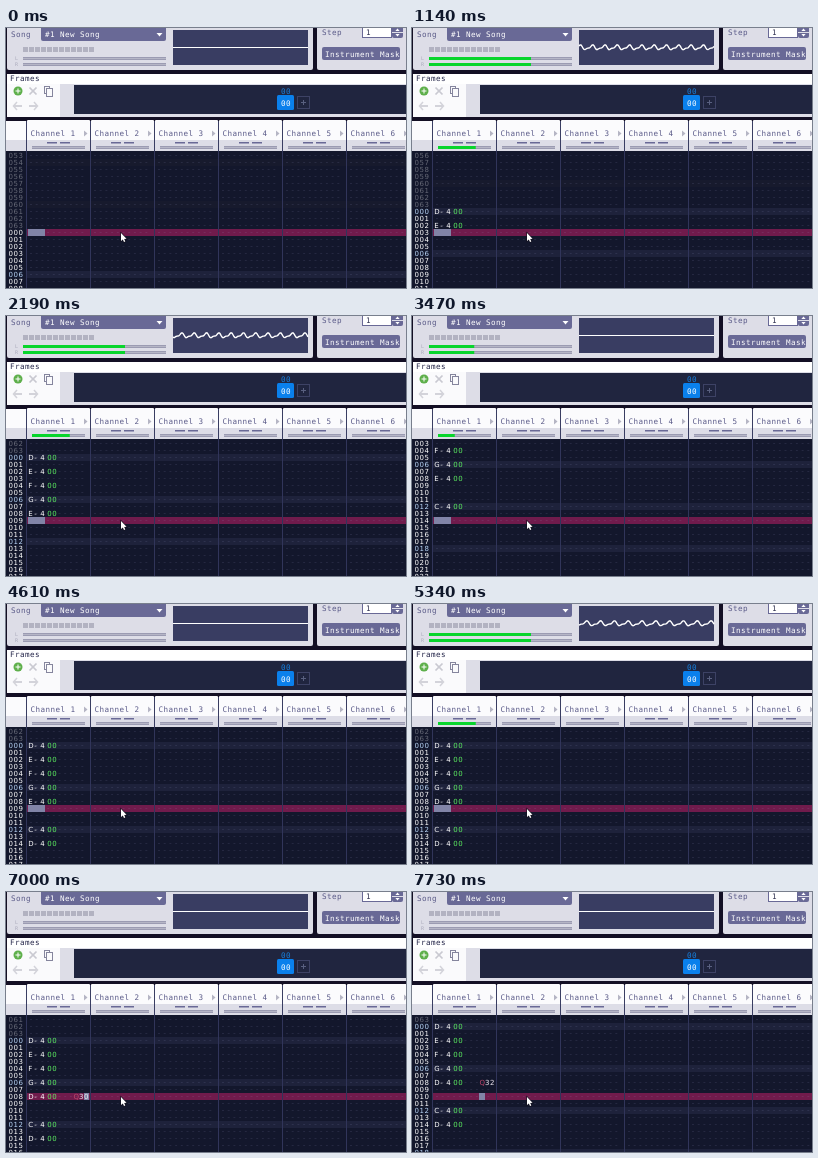
An HTML page with a canvas for the animation above (8 s loop, 400 by 260 pixels).

```html
<!DOCTYPE html>
<html lang="en">
<head>
<meta charset="utf-8">
<title>Tracker</title>
<style>
html, body { margin: 0; width: 400px; height: 260px; overflow: hidden; background: #130f24; }
canvas { display: block; }
</style>
</head>
<body>
<canvas id="stage" width="400" height="260"></canvas>
<script>
const ctx = document.getElementById('stage').getContext('2d');
const LOOP = 8000, ROWS = 64, PITCH = 7, CURSOR_Y = 201;
const PANEL = '#dddde7', PURPLE = '#696996', LABEL = '#5a5a88', GRAY = '#9b9bb2';
const GREEN = '#08d52c', NAVY = '#393d62';

// Notes are played on every second row, one per beat.
const phrases = [
  { start: 660, beat: 365, row: 0, keys: 'DEFGE' },
  { start: 3130, beat: 410, row: 12, keys: 'CD' },
  { start: 5270, beat: 400, row: 8, keys: 'D' }
];
const semitones = { C: 0, D: 2, E: 4, F: 5, G: 7 };
const notes = phrases.flatMap(({ start, beat, row, keys }) => [...keys].map((key, i) => ({
  on: start + i * beat,
  off: start + (i + 0.58) * beat,
  row: row + i * 2,
  name: key + '-4',
  period: 15.5 * 2 ** (-semitones[key] / 12)
})));

const glides = [
  { start: 0, end: 1, from: 0, to: 0 },
  { start: 660, end: 2667, from: 1, to: 12 },
  { start: 3130, end: 3745, from: 13, to: 16 },
  { start: 4410, end: 4610, from: 15, to: 9 },
  { start: 4870, end: 4871, from: 8, to: 8 },
  { start: 5270, end: 5271, from: 9, to: 9 },
  { start: 5750, end: 5751, from: 8, to: 8 }
];
const effect = { start: 6280, every: 560, back: 130, leave: 7730, row: 8, value: 'Q32' };
const cells = [[22, 17], [41, 11], [54, 11], [67, 6], [73, 5], [78, 5]];

const clamp = (v, lo, hi) => Math.min(hi, Math.max(lo, v));

function cursorAt(t) {
  if (t >= effect.leave) return { row: effect.row + 2, cell: 3 };
  if (t >= effect.start) {
    const age = t - effect.start;
    const digit = Math.floor(age / effect.every);
    const stepped = age % effect.every < effect.back;
    return { row: effect.row + stepped, cell: Math.min(5, 3 + digit + !stepped) };
  }
  const { start, end, from, to } = glides.findLast(g => g.start <= t);
  const u = clamp((t - start) / (end - start), 0, 1);
  return {
    row: Math.floor(from + (to - from) * u),
    cell: clamp(Math.floor((t - 5750) / 133), 0, 3)
  };
}

function soundAt(t) {
  const note = notes.findLast(n => n.on <= t);
  if (!note) return { level: 0, period: 0 };
  const held = t < note.off;
  return {
    level: held ? 102 : Math.max(0, 102 - (t - note.off) * 0.55),
    period: held ? note.period : 0
  };
}

function rect(x, y, w, h, color) {
  ctx.fillStyle = color;
  ctx.fillRect(x, y, w, h);
}

function round(x, y, w, h, color, r = 2) {
  ctx.fillStyle = color;
  ctx.beginPath();
  ctx.roundRect(x, y, w, h, r);
  ctx.fill();
}

function frame(x, y, w, h, color) {
  ctx.strokeStyle = color;
  ctx.lineWidth = 1;
  ctx.strokeRect(x + 0.5, y + 0.5, w, h);
}

function triangle(x, y, dx, dy, color) {
  ctx.fillStyle = color;
  ctx.beginPath();
  ctx.moveTo(x + dx, y + dy);
  ctx.lineTo(x - dy * 0.85, y + dx * 0.85);
  ctx.lineTo(x + dy * 0.85, y - dx * 0.85);
  ctx.fill();
}

function line(points, color, width = 1) {
  ctx.strokeStyle = color;
  ctx.lineWidth = width;
  ctx.beginPath();
  points.forEach(([x, y]) => ctx.lineTo(x, y));
  ctx.stroke();
}

function text(str, x, y, color, size = 7.6) {
  ctx.font = `${size}px "DejaVu Sans Mono", monospace`;
  ctx.letterSpacing = `${5 - size * 0.602}px`;
  ctx.fillStyle = color;
  ctx.fillText(str, x, y);
}

function gridText(str, x, y, color) {
  ctx.font = '7px "DejaVu Sans", sans-serif';
  ctx.letterSpacing = '0.6px';
  ctx.fillStyle = color;
  ctx.fillText(str, x, y);
}

function plus(x, y, r, color) {
  rect(x - r, y - 0.5, 2 * r, 1, color);
  rect(x - 0.5, y - r, 1, 2 * r, color);
}

function arrow(x, y, dir, color) {
  rect(x - 4, y - 1, 8, 2, color);
  line([[x + dir, y - 4], [x + dir * 4.5, y], [x + dir, y + 4]], color, 1.5);
}

function meter(x, y, w, filled) {
  rect(x, y, w, 3, GRAY);
  rect(x, y + 1, w, 1, '#b5b5c6');
  rect(x, y, filled, 3, GREEN);
}

function drawWave(t, period) {
  rect(167, 2, 135, 35, NAVY);
  const points = [];
  for (let x = 0; x <= 135; x++) {
    const a = 2 * Math.PI * (x / (period || 1) + t / 310);
    const y = period ? 2 * Math.sin(a) + 0.9 * Math.sin(2 * a + 0.6) : 0;
    points.push([167 + x, 19.5 + y]);
  }
  line(points, '#fff', period ? 1.4 : 1);
}

function drawTop(t, sound) {
  round(1, -4, 306, 46, PANEL);
  text('Song', 5, 8.5, LABEL);
  round(35, -2, 125, 15, PURPLE);
  text('#1 New Song', 39, 8.5, '#fff');
  triangle(153.5, 5, 0, 3.5, '#fff');
  for (let i = 0; i < 12; i++) rect(17 + i * 6, 19, 5, 5, '#b2b2c1');
  ['L', 'R'].forEach((side, i) => {
    text(side, 9, 32 + i * 6, '#aaaabc', 5);
    meter(17, 29 + i * 6, 143, sound.level);
  });
  drawWave(t, sound.period);

  round(311, -4, 95, 46, PANEL);
  text('Step', 316, 6.5, LABEL);
  rect(356, -1, 30, 11, PURPLE);
  rect(357, -1, 28, 10, '#fff');
  text('1', 360, 6.5, '#303250');
  round(386, -2, 11, 12, PURPLE);
  rect(386, 4, 11, 1, PANEL);
  triangle(391.5, 3, 0, -2.5, '#fff');
  triangle(391.5, 6, 0, 2.5, '#fff');
  round(316, 19, 78, 13, PURPLE);
  text('Instrument Mask', 319, 28.5, '#fff');
}

function drawFrames() {
  round(1, 46, 405, 43, PANEL);
  rect(1, 46, 399, 10, '#fff');
  rect(1, 56, 53, 33, '#fafafc');
  text('Frames', 4, 53, '#25264a');
  rect(68, 57, 332, 29, '#20253f');
  text('00', 275, 65.5, '#1680df');
  round(271, 67, 17, 15, '#0a80ec', 1.5);
  text('00', 275, 77.5, '#fff');
  frame(291, 68, 12, 12, '#3d4265');
  plus(297.5, 74.5, 2.5, '#596080');

  round(7.5, 58.5, 9, 9, '#5eaf4b', 5);
  plus(12, 63, 2.5, '#fff');
  line([[23.5, 59.5], [30.5, 66.5]], '#c9c9d1', 1.7);
  line([[30.5, 59.5], [23.5, 66.5]], '#c9c9d1', 1.7);
  frame(38, 58, 5, 7, '#85859d');
  rect(40, 60, 7, 9, '#fafafc');
  frame(40, 60, 6, 8, '#85859d');
  arrow(12, 78, -1, '#d3d3da');
  arrow(27, 78, 1, '#d3d3da');
}

function drawHeaders(level) {
  rect(0, 93, 400, 30, NAVY);
  rect(0, 93, 20, 20, '#fbfbfd');
  rect(0, 112, 20, 11, PANEL);
  for (let i = 0; i < 6; i++) {
    const x = 21 + i * 64;
    round(x, 92, 63, 31, '#fbfbfd', 1);
    rect(x, 112, 63, 11, PANEL);
    text('Channel ' + (i + 1), x + 3.5, 108, LABEL);
    triangle(x + 57, 105.5, 3.5, 0, '#b5b5c4');
    rect(x + 20, 114, 10, 1.5, PURPLE);
    rect(x + 33, 114, 10, 1.5, PURPLE);
    meter(x + 5, 118, 53, i ? 0 : level * 0.37);
  }
}

function drawRow(index, y, t, current) {
  const row = (index + ROWS) % ROWS;
  const base = y + 5.6;
  const ghost = index < 0;
  const accent = row % 6 === 0;

  if (current) rect(21, y, 379, PITCH, '#701b4c');
  else if (accent) rect(21, y, 379, PITCH, ghost ? '#171a2d' : '#1e223b');
  for (let x = 20; x < 400; x += 64) {
    for (let i = 0; i < 10; i++) rect(x + 4 + i * 5.7, y + 3, 2, 1, 'rgba(160,160,210,.12)');
  }
  if (current) {
    const [x, w] = cells[cursorAt(t).cell];
    rect(x, y, w, PITCH, '#8184a7');
  }
  const color = ghost ? '#666977' : accent && !current ? '#b9d6f8' : '#fff';
  gridText(String(row).padStart(3, '0'), 2.5, base, color);
  if (ghost) return;

  const note = notes.findLast(n => n.on <= t && n.row === row);
  if (note) {
    [...note.name].forEach((c, i) => gridText(c, 22.3 + i * 6, base, '#fff'));
    gridText('00', 41.3, base, '#5cf060');
  }
  if (row === effect.row && t >= effect.start) {
    const typed = Math.floor((t - effect.start) / effect.every) + 1;
    const shown = effect.value.slice(0, typed).padEnd(3, '0');
    gridText(shown[0], 67.5, base, '#c0486c');
    gridText(shown.slice(1), 73, base, '#f0e8f0');
  }
}

function drawPattern(t) {
  const cursor = cursorAt(t);
  ctx.save();
  ctx.beginPath();
  ctx.rect(0, 123, 400, 137);
  ctx.clip();
  rect(0, 123, 400, 137, '#13172c');
  for (let offset = -11; offset <= 8; offset++) {
    drawRow(cursor.row + offset, CURSOR_Y + offset * PITCH, t, offset === 0);
  }
  for (let x = 20; x < 400; x += 64) rect(x, 123, 1, 137, '#31355a');
  ctx.restore();
}

function drawPointer() {
  const shape = new Path2D('M115 205V213L116.8 211.5L118 214L119.3 213.4L118.2 211L120.5 210.7Z');
  ctx.strokeStyle = '#14121f';
  ctx.lineWidth = 1.2;
  ctx.stroke(shape);
  ctx.fillStyle = '#fff';
  ctx.fill(shape);
}

function draw(t) {
  const sound = soundAt(t);
  rect(0, 0, 400, 260, '#130f24');
  drawTop(t, sound);
  drawFrames();
  drawHeaders(sound.level);
  drawPattern(t);
  drawPointer();
}

const start = performance.now();
function tick() {
  draw((performance.now() - start) % LOOP);
  requestAnimationFrame(tick);
}
tick();
</script>
</body>
</html>
```
